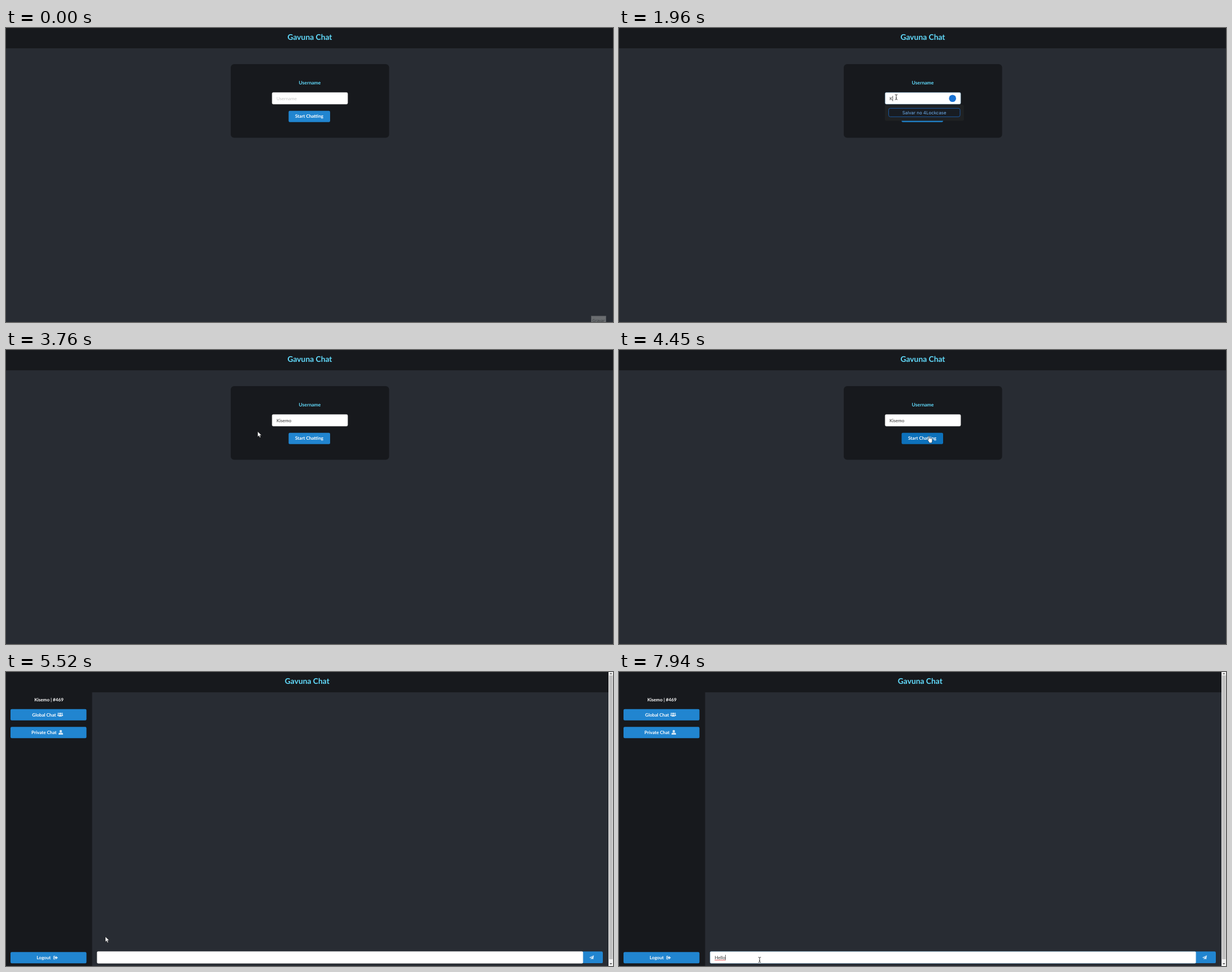
Write an HTML page that moves like this. It is 1075 by 521 pixels and loops after 8000 ms.

```html
<!DOCTYPE html>
<html lang="en">
<head>
<meta charset="utf-8">
<title>Gavuna Chat</title>
<style>
  html, body { margin: 0; width: 100%; height: 100%; overflow: hidden; background: #282c33; }
  svg { display: block; width: 100vw; height: 100vh; }
  text { font: 8.1px Lato, sans-serif; text-rendering: geometricPrecision; white-space: pre; }
  .mid { text-anchor: middle; }
  .bold { font-weight: 700; fill: #fff; }
  .title { font-size: 13.8px; font-weight: 700; fill: #61dafb; }
  .label { font-size: 8.6px; font-weight: 700; fill: #61dafb; }
  .dark { fill: #17191d; }
  .blue { fill: #2185d0; }
  .typed { fill: #333; }
  .caret { stroke: #333; stroke-width: .8; }
  .icon { fill: #fff; opacity: .8; }
  .tofu { fill: none; stroke: #fff; stroke-width: .6; opacity: .85; }
</style>
</head>
<body>
<svg viewBox="0 0 1075 521" preserveAspectRatio="none">
  <rect width="1075" height="521" fill="#282c33"/>
  <rect class="dark" width="1075" height="36"/>

  <g id="login">
    <text class="title mid" x="538" y="20.5">Gavuna Chat</text>
    <rect class="dark" x="398" y="64" width="280.5" height="130.5" rx="6"/>
    <text class="label mid" x="538" y="100.3">Username</text>
    <rect id="nameBox" x="471.3" y="114.3" width="133.8" height="20.6" rx="2.2" fill="#fff" stroke-width=".6"/>
    <text id="hint" x="479" y="128">Username</text>
    <text id="name" class="typed" x="479" y="128"></text>
    <line id="nameCaret" class="caret" y1="120.3" y2="129.7"/>
    <circle id="badge" cx="590.7" cy="124.8" r="6.3" fill="#1a73d4"/>
    <rect id="start" x="500.5" y="146.8" width="73.5" height="20" rx="2.2"/>
    <text class="bold mid" x="537" y="159.4">Start Chatting</text>
    <g id="menu">
      <rect x="470.8" y="136" width="140" height="28.4" rx="3" fill="#1f2123"/>
      <rect x="477.5" y="142.3" width="126.5" height="15" rx="3" fill="#181c22" stroke="#1b5fae" stroke-width=".9"/>
      <text class="mid" x="540.7" y="152.8" fill="#70b2f2" style="font:7.9px Inter, sans-serif">Salvar no 4Lockcase</text>
    </g>
    <g id="tip">
      <rect x="1036.5" y="510.3" width="26" height="14" fill="#6a6d70" stroke="#55585c" stroke-width=".8"/>
      <text class="mid" x="1049.3" y="520.6" fill="#35383c" style="font:7px 'Open Sans', sans-serif">Gravar</text>
    </g>
  </g>

  <g id="chat">
    <text class="title mid" x="533.3" y="20.5">Gavuna Chat</text>
    <rect class="dark" y="36" width="152.5" height="485"/>
    <text class="bold mid" x="76" y="52">Kisemo | #469</text>
    <g class="blue">
      <rect x="8" y="65.8" width="134.5" height="20" rx="2.2"/>
      <rect x="8" y="97.2" width="134.5" height="20" rx="2.2"/>
      <rect x="8" y="496.3" width="134.5" height="20" rx="2.2"/>
      <rect x="1020" y="495.3" width="37" height="20.8" rx="2.2"/>
    </g>
    <text class="bold" x="46.3" y="78.6">Global Chat</text>
    <text class="bold" x="45" y="110">Private Chat</text>
    <text class="bold" x="54.3" y="509.2">Logout</text>
    <g id="boxes" class="tofu">
      <rect x="93.6" y="72.7" width="3.8" height="6"/>
      <rect x="95.3" y="104.1" width="3.8" height="6"/>
      <rect x="85.7" y="503.2" width="3.8" height="6"/>
      <rect x="1034.8" y="502.8" width="3.8" height="6"/>
    </g>
    <g id="icons" class="icon">
      <path d="M91 78v-1.6q0-1.5 1.5-1.5h1.2q-.9.8-.9 3.1zM101 78v-1.6q0-1.5-1.5-1.5h-1.2q.9.8.9 3.1zM93.2 79v-1.6q0-1.7 1.7-1.7h2.2q1.7 0 1.7 1.7V79z"/>
      <circle cx="92.7" cy="73.4" r="1.2"/><circle cx="99.3" cy="73.4" r="1.2"/><circle cx="96" cy="73.7" r="1.8"/>
      <circle cx="97" cy="105" r="2.2"/>
      <path d="M93 111v-1.2q0-2.2 2.2-2.2h3.6q2.2 0 2.2 2.2v1.2z"/>
      <path d="M87 503v1.2h-1.8v4.2H87v1.2h-1.8q-1.3 0-1.3-1.3v-4q0-1.3 1.3-1.3zM88.2 503.2l3.8 3.1-3.8 3.1v-1.9h-2.4v-2.4h2.4z"/>
      <path d="M1041.2 502l-1.2 7.2-2.8-1.2-1.4 2v-2.6l4.2-4.4-5 3.9-2-.8z"/>
    </g>
    <rect id="msgBox" x="161.3" y="495.3" width="860.5" height="21" rx="2" fill="#fff" stroke-width=".6"/>
    <text id="msg" class="typed" x="169.4" y="509.3"></text>
    <line id="msgCaret" class="caret" y1="501.2" y2="510.8"/>
    <line id="squiggle" x1="169.4" x2="188.3" y1="510.6" y2="510.6" stroke="#e03030" stroke-width=".8"/>
    <rect x="1067" width="8" height="521" fill="#f1f1f1"/>
    <rect x="1068" y="6" width="6.4" height="503" fill="#c1c1c1"/>
    <path d="M1069 3.8l2.3-2.4 2.3 2.4zM1069 516l2.3 2.4 2.3-2.4z" fill="#505050"/>
  </g>

  <g id="arrow"><path d="M0 0v9.3l2.2-2 1.5 3.5 1.6-.7-1.5-3.4h3z" fill="#fff" stroke="#111" stroke-width=".5"/></g>
  <g id="beam" fill="none">
    <path d="M-2.3-4.5q2.3 0 2.3 1v7q0 1-2.3 1M2.3-4.5q-2.3 0-2.3 1M2.3 4.5q-2.3 0-2.3-1" stroke="#fff" stroke-width="1.6" opacity=".6"/>
    <path d="M-2.3-4.5q2.3 0 2.3 1v7q0 1-2.3 1M2.3-4.5q-2.3 0-2.3 1M2.3 4.5q-2.3 0-2.3-1M-1 1.6h2" stroke="#222" stroke-width=".9"/>
  </g>
  <g id="hand"><path d="M-.9.8q.9-1.3 1.8 0v4q.9-.7 1.7.1.8-.6 1.6.2 1.4-.4 1.5.9v3q0 1.2-.7 2.2v1.4H.3V11.4L-2.2 7.7q-.5-1.2.6-1.2l.7.8z" fill="#fff" stroke="#111" stroke-width=".5"/></g>
</svg>
<script>
const LOOP = 8000;
const el = id => document.getElementById(id);

// Pointer runs: shape, start, end, steps, then [time, x, y] points.
const runs = [
  { from: 70, to: 870, steps: 13, path: [[70, 1052, 508], [270, 978, 488], [530, 765, 325], [600, 738, 314], [870, 553, 232]] },
  { from: 940, to: 1560, steps: 10, path: [[940, 530, 208], [1080, 457, 126], [1215, 418, 118], [1420, 478, 121], [1560, 491, 122.5]] },
  { from: 3280, to: 4040, steps: 11, path: [[3280, 491, 122.5], [3360, 490, 122], [3510, 464, 112], [3660, 442, 135], [3740, 446, 145], [3890, 500, 166], [4040, 549, 152]] },
  { from: 4580, to: 4640, steps: 1, path: [[4580, 549.7, 152]] },
  { from: 5100, to: 5590, steps: 8, path: [[5100, 548, 146], [5310, 340, 258], [5520, 176, 469], [5590, 176, 469]] },
  { from: 5850, to: 6260, steps: 6, path: [[5850, 212, 507], [6100, 247, 510], [6260, 249, 510]] }
];

const nameKeys = [1960, 2220, 2420, 2550, 2750, 2880];
const msgKeys = [6880, 7210, 7310, 7400, 7670];
const FOCUS = 1560, BLUR = 3740, PAGE = 4580, ICONS = 4640, WRITE = 6260;

const typed = (word, keys, t) => word.slice(0, keys.filter(k => t >= k).length);
const show = (id, on) => { el(id).style.display = on ? "" : "none"; };
const within = (t, a, b) => t >= a && t < b;

function along(path, t) {
  const i = path.findIndex(p => p[0] >= t);
  if (i < 0) return path[path.length - 1].slice(1);
  if (i === 0) return path[0].slice(1);
  const [a, b] = [path[i - 1], path[i]];
  const k = (t - a[0]) / (b[0] - a[0]);
  return [a[1] + (b[1] - a[1]) * k, a[2] + (b[2] - a[2]) * k];
}

function pointerAt(t) {
  const run = runs.filter(r => t >= r.from).pop();
  if (!run) return null;
  const gap = (run.to - run.from) / Math.max(1, run.steps - 1);
  const step = Math.min(run.steps - 1, Math.floor((t - run.from) / gap + 0.06));
  return along(run.path, run.from + step * gap);
}

function shapeAt(t, x, y) {
  const inBox = (l, top, r, b) => x >= l && x <= r && y >= top && y <= b;
  if (t < PAGE) {
    if (inBox(471, 114, 605, 135)) return "beam";
    return inBox(500, 147, 574, 166.5) && t >= BLUR ? "hand" : "arrow";
  }
  return inBox(161, 495, 1022, 517) ? "beam" : "arrow";
}

function drawPointer(t) {
  const pos = within(t, 5590, 5850) ? null : pointerAt(t);
  const shape = pos && shapeAt(t, ...pos);
  for (const id of ["arrow", "beam", "hand"]) show(id, id === shape);
  if (pos) el(shape).setAttribute("transform", `translate(${pos[0]} ${pos[1]})`);
  return shape;
}

function drawField(text, caret, value, on) {
  if (el(text).textContent !== value) el(text).textContent = value;
  show(caret, on);
  if (!on) return;
  const x = +el(text).getAttribute("x") + 0.4 + (value ? el(text).getComputedTextLength() : 0);
  el(caret).setAttribute("x1", x);
  el(caret).setAttribute("x2", x);
}

function drawLogin(t, shape) {
  const focus = within(t, FOCUS, BLUR);
  const name = typed("Kisemo", nameKeys, t);
  drawField("name", "nameCaret", name, focus);
  show("hint", !name);
  el("hint").setAttribute("fill", focus ? "#858585" : "#c8c8c8");
  el("nameBox").setAttribute("stroke", focus ? "#85b7d9" : "#e4e4e5");
  show("badge", focus);
  show("menu", within(t, nameKeys[0], BLUR));
  show("tip", t < 70);
  const fill = within(t, 4310, 4380) ? "#1a69a4" : t >= 4380 ? "#0d71bb" : shape === "hand" ? "#1678c2" : "#2185d0";
  el("start").setAttribute("fill", fill);
}

function drawChat(t) {
  const caretOn = t >= WRITE && !within(t, 6730, 6880) && !within(t, 7670, 7870);
  drawField("msg", "msgCaret", typed("Hello", msgKeys, t), caretOn);
  el("msgBox").setAttribute("stroke", t >= WRITE ? "#85b7d9" : "#e4e4e5");
  show("boxes", t < ICONS);
  show("icons", t >= ICONS);
  show("squiggle", t >= 7940);
}

function render(now) {
  const t = now % LOOP;
  const shape = drawPointer(t);
  show("login", t < PAGE);
  show("chat", t >= PAGE);
  if (t < PAGE) drawLogin(t, shape);
  else drawChat(t);
}

const began = performance.now();
function frame() {
  render(performance.now() - began);
  requestAnimationFrame(frame);
}
frame();
</script>
</body>
</html>
```
